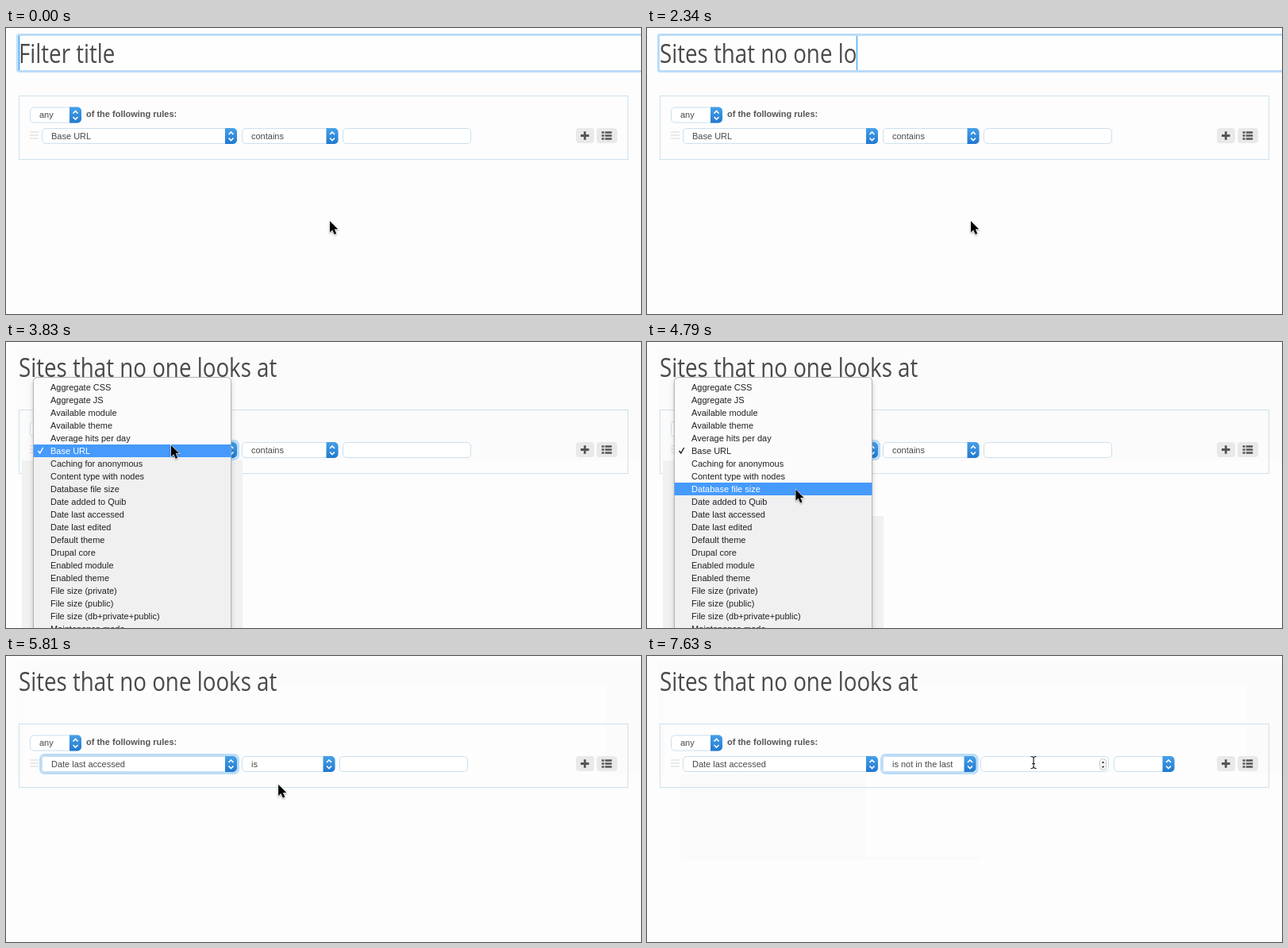
Recreate the animation shown at these times as an HTML page. Size 800 by 360 pixels, loop 8000 ms.

```html
<!DOCTYPE html>
<html lang="en">
<head>
<meta charset="utf-8">
<title>Filter builder</title>
<style>
html, body { margin: 0; width: 100%; height: 100%; overflow: hidden; background: #fdfdfd; }
svg { display: block; width: 100%; height: 100%; }
text { font: 11px "Liberation Sans", Arial, sans-serif; fill: #4a4a4a; white-space: pre; }
.bold { font-weight: bold; fill: #555; }
.title { font: 33.6px "Open Sans", sans-serif; }
.menu text { fill: #222; }
.ring { fill: none; stroke: #bbdcf8; stroke-width: 3; }
</style>
</head>
<body>
<svg id="stage" viewBox="0 0 800 360"></svg>
<script>
const LOOP = 8000;
const TITLE = 'Sites that no one looks at';
const HINT = 'Filter title';
const NARROW = 0.825;
const LAG = 30; // the highlight trails the pointer a little

// Typing bursts: start, end, number of keys
const BURSTS = [[420, 960, 7], [1140, 1920, 9], [2040, 2160, 3], [2340, 2940, 7]];
const KEYS = BURSTS.flatMap(([a, b, n]) =>
  Array.from({ length: n }, (_, i) => a + (b - a) * i / (n - 1)));

const smooth = k => k * k * (3 - 2 * k);
const easeIn = k => k * k;
const easeOut = k => k * (2 - k);

// Pointer path: time, x, y, easing towards this point
const PATH = [
  [3120, 408, 243], [3700, 208, 130, smooth],
  [4490, 208, 130], [4970, 178, 211, smooth],
  [5440, 178, 211], [5810, 343, 162, easeIn], [6090, 362, 137, easeOut],
  [6450, 362, 137], [6630, 366, 179, easeIn], [7110, 362, 231, easeOut],
  [7390, 362, 231], [7630, 487, 134, smooth]
];

const FIELDS = ['Aggregate CSS', 'Aggregate JS', 'Available module', 'Available theme',
  'Average hits per day', 'Base URL', 'Caching for anonymous', 'Content type with nodes',
  'Database file size', 'Date added to Quib', 'Date last accessed', 'Date last edited',
  'Default theme', 'Drupal core', 'Enabled module', 'Enabled theme', 'File size (private)',
  'File size (public)', 'File size (db+private+public)', 'Maintenance mode'];
const TESTS = ['is', 'is not', 'is after', 'is before', 'is between', 'is in the last',
  'is not in the last'];

const MENUS = [
  { id: 'fields', items: FIELDS, x: 34, y: 44, w: 250, h: 340, top: 49, checked: 5,
    open: 3770, pick: 5330, close: 5450 },
  { id: 'tests', items: TESTS, x: 287, y: 124, w: 119.5, h: 121.5, top: 129, checked: 0,
    open: 6150, pick: 7220, close: 7390 }
];
const FADE = 110;

const rect = (x, y, w, h, fill, extra = '') =>
  `<rect x="${x}" y="${y}" width="${w}" height="${h}" fill="${fill}" ${extra}/>`;
const label = (x, y, str, extra = '') => `<text x="${x}" y="${y}" ${extra}>${str}</text>`;
const box = (x, y, w) =>
  rect(x + .5, y + .5, w - 1, 19, '#fff', 'rx="4.5" stroke="#c9e0f0"');
const ring = (id, x, w) =>
  rect(x - 1.5, 124.5, w + 3, 23, 'none', `id="${id}" class="ring" rx="5"`);
const select = (x, y, w, str, id = '') => box(x, y, w) +
  `<path d="M${x + w - 15} ${y}h10a5 5 0 0 1 5 5v10a5 5 0 0 1-5 5h-10z" fill="url(#blue)"/>
   <path d="M${x + w - 10.5} ${y + 8}l3-3 3 3m-6 4.5l3 3 3-3" fill="none" stroke="#fff" stroke-width="1.6"/>` +
  label(x + 12, y + 13.5, str, id && `id="${id}"`);

const menu = m => `<g id="${m.id}" class="menu">
  <g id="${m.id}Back"></g>
  ${rect(m.x + .5, m.y + .5, m.w - 1, m.h, '#fbfbfb', 'rx="5" filter="url(#shade)"')}
  ${rect(m.x + 1, m.y, m.w - 2, 0, '#f0f0f0', `id="${m.id}Grey"`)}
  ${rect(m.x + .5, m.y + .5, m.w - 1, m.h, 'none', 'rx="5" stroke="#b4b4b4"')}
  ${rect(m.x + .5, 0, m.w - 1, 16, '#459afc', `id="${m.id}Bar"`)}
  ${m.items.map((s, i) => label(m.x + (m.id === 'fields' ? 22 : 21), m.top + 12 + 16 * i, s)).join('')}
  <path id="${m.id}Tick" d="M${m.x + 6.5} ${m.top + 16 * m.checked + 8}l2.2 3 4-7" fill="none" stroke-width="1.5"/>
</g>`;

const stage = document.getElementById('stage');
stage.innerHTML = `
<defs>
  <linearGradient id="blue" x2="0" y2="1">
    <stop stop-color="#46a0e8"/><stop offset="1" stop-color="#2179cf"/>
  </linearGradient>
  <filter id="shade" x="-20%" y="-20%" width="140%" height="140%">
    <feDropShadow dx="0" dy="3" stdDeviation="3" flood-opacity=".22"/>
  </filter>
</defs>
${rect(0, 0, 800, 360, '#fdfdfd')}
${rect(13, 7, 787, 142, '#fbfbfb', 'id="tintTop"')}
${rect(22, 38, 733, 322, '#fdfdfd', 'id="tintPage"')}
${rect(42, 149, 378, 108, '#fafafa', 'id="tintLow"')}
${rect(275, 149, 205, 104, '#fdfdfd', 'id="tintEnd"')}
<g id="focus">
  ${rect(14.5, 8.5, 800, 46, '#fefefe', 'rx="2" stroke="#bbdcf8" stroke-width="3"')}
</g>
<text id="title" class="title" transform="translate(16 44) scale(${NARROW} 1)"></text>
${rect(0, 10, 1, 43, '#2196f3', 'id="caret"')}
${rect(16.5, 85.5, 767, 80, 'none', 'stroke="#cfe1ec"')}
${select(30, 99.5, 65, 'any')}
${label(101, 112, 'of the following rules:', 'class="bold"')}
<path d="M30 131h11m-11 4h11m-11 4h11" stroke="#e3e3e3" stroke-width="1.4"/>
${ring('ring1', 45, 246)}
${select(45, 126, 246, '', 'field')}
<g id="before">${select(297, 126, 121.5, 'contains')}${box(424, 126, 162)}</g>
<g id="after">
  ${ring('ring2', 297, 117.5)}
  ${select(297, 126, 117.5, '', 'test')}
  ${box(420, 126, 162)}
</g>
<g id="unit">
  ${rect(570.5, 129.5, 8, 14, '#fff', 'rx="4" stroke="#c4c4c4"')}
  <path d="M572.5 135l2-3 2 3zm0 3.5l2 3 2-3z" fill="#555"/>
  ${select(588, 126, 76.5, '')}
</g>
${rect(718, 126, 23, 19, '#e9e9e9', 'rx="4"')}
<path d="M724 135.5h10.500m-5.250-5.250v10.500" stroke="#555" stroke-width="2.800"/>
${rect(744, 126, 26, 19, '#e9e9e9', 'rx="4"')}
<path d="M750.500 131.500h3m1.200 0h8.500m-12.700 4h3m1.200 0h8.500m-12.700 4h3m1.200 0h8.500" stroke="#555" stroke-width="2.600"/>
${MENUS.map(menu).join('')}
<path id="arrow" d="M0 0V14.200L3.200 11.200 5.700 16.800 8.200 15.700 5.800 10.300H10.200Z" stroke="#fff" stroke-width="1.200" paint-order="stroke" filter="drop-shadow(0 1px 1px rgba(0,0,0,.35))"/>
<path id="beam" d="M-3.500-7.500Q0-7.500 0-5Q0-7.500 3.500-7.500M0-5.500V5.500M-3.500 7.500Q0 7.500 0 5Q0 7.500 3.500 7.500M-2 1.500H2" fill="none" stroke="#222" stroke-width="1.200"/>`;

const el = {};
stage.querySelectorAll('[id]').forEach(n => { el[n.id] = n; });
const show = (id, on) => { el[id].style.display = on ? '' : 'none'; };
const write = (id, str) => { if (el[id].textContent !== str) el[id].textContent = str; };
const set = (id, attrs) => {
  for (const k in attrs) el[id].setAttribute(k, attrs[k]);
};

el.fieldsBack.innerHTML = rect(20, 149, 14, 211, '#f1f1f1') +
  rect(284, 149, 14, 211, '#f1f1f1', 'id="sideShade"');
el.sideShade = document.getElementById('sideShade');

const pen = document.createElement('canvas').getContext('2d');
pen.font = '33.6px "Open Sans", sans-serif';

function pointer(t) {
  let i = PATH.findIndex(p => p[0] > t);
  if (i === 0) return PATH[0].slice(1, 3);
  if (i < 0) return PATH[PATH.length - 1].slice(1, 3);
  const [a, x, y] = PATH[i - 1], [b, u, v, ease = smooth] = PATH[i];
  const k = ease((t - a) / (b - a));
  return [x + (u - x) * k, y + (v - y) * k];
}

function drawTitle(t) {
  const typed = TITLE.slice(0, KEYS.filter(k => t >= k).length);
  const focused = t < MENUS[0].open;
  write('title', typed || HINT);
  set('title', { fill: typed ? '#2196f3' : '#a9a9a9' });
  show('focus', focused);
  show('caret', focused && (t < 60 || typed));
  set('caret', { x: Math.round(16 + pen.measureText(typed).width * NARROW) });
}

function drawMenu(m, t) {
  const on = t >= m.open && t < m.close + FADE;
  show(m.id, on);
  if (!on) return;
  const y = pointer(t - LAG)[1];
  const row = Math.min(m.items.length - 1, Math.max(0, Math.floor((y - m.top) / 16)));
  const lit = t < m.pick || t >= m.close - 60;
  el[m.id].style.opacity = Math.min(1, 1 - (t - m.close) / FADE);
  show(m.id + 'Bar', lit);
  set(m.id + 'Bar', { y: m.top + 16 * row });
  set(m.id + 'Tick', { stroke: lit && row === m.checked ? '#fff' : '#222' });
  el[m.id].querySelectorAll('text').forEach((n, i) => {
    n.style.fill = lit && i === row ? '#fff' : '';
  });
  if (m.id === 'fields') {
    const split = Math.min(177, Math.max(145, m.top + 16 * row));
    set('fieldsGrey', { y: split, height: 360 - split });
    const side = split > 145 ? 219 : 149;
    set('sideShade', { y: side, height: 360 - side });
  } else {
    set('testsGrey', { y: m.y + 3, height: 34 });
  }
}

function render(t) {
  const picked = t >= MENUS[0].close + 60;
  const done = t >= MENUS[1].close + 60;
  drawTitle(t);
  show('tintTop', t >= MENUS[0].open);
  show('tintPage', picked);
  show('tintLow', t >= MENUS[1].open);
  show('tintEnd', done);
  write('field', picked ? 'Date last accessed' : 'Base URL');
  write('test', done ? 'is not in the last' : 'is');
  show('before', !picked);
  show('after', picked);
  show('unit', done);
  show('ring1', t >= MENUS[0].open && t < MENUS[1].open);
  show('ring2', t >= MENUS[1].open);
  MENUS.forEach(m => drawMenu(m, t));

  const [x, y] = pointer(t);
  const overInput = x > 420 && y > 126 && y < 146;
  show('arrow', !overInput);
  show('beam', overInput);
  set(overInput ? 'beam' : 'arrow', { transform: `translate(${x} ${y})` });
}

const start = performance.now();
function tick() {
  render((performance.now() - start) % LOOP);
  requestAnimationFrame(tick);
}
tick();
</script>
</body>
</html>
```
